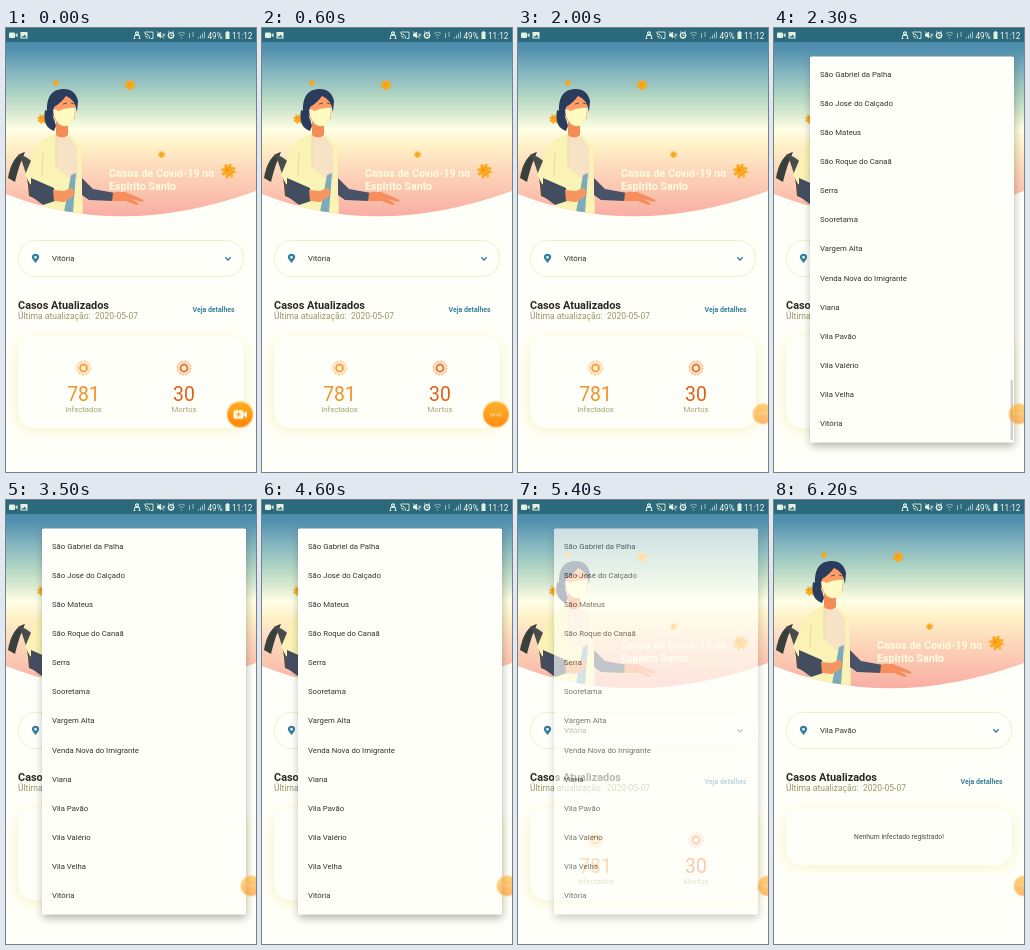
Recreate the animation shown at these times as an HTML page. Size 250x444 px, loop 8 s.

```html
<!DOCTYPE html>
<html lang="pt-BR">
<head>
<meta charset="utf-8">
<title>Casos de Covid-19</title>
<style>
html, body { margin: 0; width: 100%; height: 100%; overflow: hidden; background: #fffffa; }
svg { display: block; width: 100vw; height: 100vh; font-family: Roboto, sans-serif; }
text { white-space: pre; }
.body { font-size: 7.75px; fill: #33332b; }
.bold { font-weight: 700; }
.mid { text-anchor: middle; }

.menu, .thumb, .before, .after, .camera, .timer, .fab { animation: 8s linear infinite; }
.menu { animation-name: menu; }
.thumb { animation-name: thumb; }
.before { animation-name: before; }
.after { animation-name: after; }
.camera { animation-name: camera; }
.timer { animation-name: timer; }
.fab { animation-name: fab; }

@keyframes menu {
  0%, 28.74% { opacity: 0; }
  28.75%, 66.3% { opacity: 1; }
  70%, 100% { opacity: 0; }
}
@keyframes thumb {
  0%, 34% { opacity: .22; }
  40%, 100% { opacity: 0; }
}
@keyframes before {
  0%, 68.74% { opacity: 1; }
  68.75%, 100% { opacity: 0; }
}
@keyframes after {
  0%, 68.74% { opacity: 0; }
  68.75%, 100% { opacity: 1; }
}
@keyframes camera {
  0%, 1.2% { opacity: 1; }
  5%, 100% { opacity: 0; }
}
@keyframes timer {
  0%, 2.5% { opacity: 0; }
  6%, 10% { opacity: .85; }
  20%, 100% { opacity: .4; }
}
@keyframes fab {
  0%, 1.2% { transform: translate(234px, 386.5px); opacity: 1; }
  6%, 9.5% { transform: translate(234px, 386.3px); opacity: .94; animation-timing-function: ease-in-out; }
  20%, 62.49% { transform: translate(245px, 386px) scale(.8); opacity: .58; }
  62.5%, 100% { transform: translate(250px, 386px) scale(.8); opacity: .58; }
}
</style>
</head>
<body>
<svg viewBox="0 0 250 444" preserveAspectRatio="none">
  <defs>
    <linearGradient id="sky" x2="0" y2="188" gradientUnits="userSpaceOnUse">
      <stop offset="0" stop-color="#3b7ca2"/>
      <stop offset=".12" stop-color="#5592b0"/>
      <stop offset=".24" stop-color="#85b7c0"/>
      <stop offset=".36" stop-color="#b0d5c2"/>
      <stop offset=".46" stop-color="#dcebd2"/>
      <stop offset=".54" stop-color="#fffee6"/>
      <stop offset=".62" stop-color="#fff3c8"/>
      <stop offset=".74" stop-color="#fddabb"/>
      <stop offset="1" stop-color="#faaea4"/>
    </linearGradient>
    <linearGradient id="orange" x2="0" y2="1">
      <stop offset="0" stop-color="#ffae1c"/>
      <stop offset="1" stop-color="#ff8608"/>
    </linearGradient>
    <clipPath id="curve"><path d="M0 0H250V163Q115 212 0 166Z"/></clipPath>
    <filter id="soft" x="-20%" y="-20%" width="140%" height="140%"><feGaussianBlur stdDeviation="4"/></filter>
    <filter id="wide" x="-20%" y="-40%" width="140%" height="180%"><feGaussianBlur stdDeviation="7"/></filter>
    <g id="virus">
      <circle r="4" fill="#f9a81e"/>
      <circle r="4.6" fill="none" stroke="#f9a81e" stroke-width="1.6" stroke-dasharray="1.8 1.8"/>
      <circle cx="-1" cy="-1" r="1.1" fill="#ec9015"/>
    </g>
    <g id="case">
      <circle r="7.4" fill="currentColor" opacity=".28"/>
      <circle r="7.2" fill="none" stroke="currentColor" stroke-width="1" stroke-dasharray="1.4 2.4" opacity=".4"/>
      <circle r="3.4" fill="#fff4d6" stroke="currentColor" stroke-width="1.7"/>
    </g>
  </defs>

  <rect width="250" height="444" fill="#fffffa"/>

  <g clip-path="url(#curve)">
    <rect width="250" height="190" fill="url(#sky)"/>
    <use href="#virus" x="124" y="57"/>
    <use href="#virus" transform="translate(50 55) scale(.6)"/>
    <use href="#virus" transform="translate(36 91) scale(.9)"/>
    <use href="#virus" transform="translate(155.500 126.500) scale(.65)"/>
    <use href="#virus" transform="translate(222.500 143) scale(1.350)"/>

    <!-- Doctor at the desk -->
    <path d="M2 150Q6 127 19 124Q13 137 9 154Z" fill="#38403c"/>
    <path d="M12 126Q29 130 36 151L38 174L23 168Q22 143 12 126Z" fill="#4a4d4c"/>
    <path d="M49 106Q35 110 30 121L19 147L24 156L36 162L34 188H77L75 124Q73 112 62 107Z" fill="#faf3b5"/>
    <path d="M50 107Q56 111 62 107L71 119L72 150L67 153L50 139Z" fill="#f8e2c6"/>
    <path d="M37 125L36 148M50 107L50 139" fill="none" stroke="#dfd79c" stroke-width=".8"/>
    <path d="M50 92H62V107Q56 112 50 107Z" fill="#f48c56"/>
    <path d="M39 82Q47 84 50 98L48 103Q36 99 39 82Z" fill="#293c5c"/>
    <path d="M45 72Q57 63 69 72V90Q66 99 57 98Q48 95 45 82Z" fill="#ff9d66"/>
    <path d="M41 87Q39 62 56 61Q69 60 72 73L71 84Q69 71 60 68Q55 75 48 79L47 90Z" fill="#293c5c"/>
    <path d="M47 81L53 83Q61 79 69 80L68 93Q65 99 57 98Q49 96 47 81Z" fill="#fffac2"/>
    <path d="M57 76L61 75M65 75L68 76" stroke="#493744" stroke-width=".8"/>
    <path d="M65 147L70 145L67 184H58Z" fill="#7eabb8"/>
    <path d="M25 150L48 160L49 173L37 177L25 168Z" fill="#434d60"/>
    <path d="M47 162L58 163L65 160L69 164L66 169L58 174L48 173Z" fill="#f79561"/>
    <path d="M76 150L87 161L109 165L107 173L83 172L76 167Z" fill="#4a5267"/>
    <path d="M107 165Q117 162 124 166L138 172L136 174L126 171L133 176L130 177L120 173L106 173Z" fill="#f58d5c"/>
  </g>
  <g class="bold" font-size="10.7" fill="#fffde0">
    <text x="103" y="149">Casos de Covid-19 no</text>
    <text x="103" y="162">Espírito Santo</text>
  </g>

  <rect x="12.500" y="212.500" width="225" height="36" rx="17" fill="#fffffa" stroke="#ebeabd" stroke-width=".8"/>
  <path d="M29.500 235Q25.900 231 25.900 229.300A3.600 3.600 0 0 1 33.100 229.300Q33.100 231 29.500 235Z" fill="#337da0"/>
  <circle cx="29.500" cy="229.300" r="1.300" fill="#fffff4"/>
  <path d="M219.200 229.300L222 232L224.800 229.300" fill="none" stroke="#337da0" stroke-width="1.300"/>
  <text class="body before" x="46" y="233">Vitória</text>
  <text class="body after" x="46" y="233">Vila Pavão</text>

  <text class="bold" x="12" y="281" font-size="10.9" fill="#292922">Casos Atualizados</text>
  <text x="12" y="291" font-size="8.55" fill="#96966a">Última atualização:  2020-05-07</text>
  <text class="bold" x="186.500" y="284" font-size="6.95" fill="#397f9d">Veja detalhes</text>

  <g class="before">
    <rect x="10" y="311" width="230" height="92" rx="16" fill="#f1efb4" opacity=".65" filter="url(#wide)"/>
    <rect x="12" y="308" width="226" height="92" rx="16" fill="#fffff9"/>
    <use href="#case" x="77.500" y="340" color="#f79b2c"/>
    <use href="#case" x="178" y="340" color="#e87030"/>
    <g class="mid" font-size="19.4">
      <text x="77.500" y="373" fill="#f4922b">781</text>
      <text x="178" y="373" fill="#e2601a">30</text>
    </g>
    <g class="mid" font-size="7.75" fill="#a3a274">
      <text x="77.500" y="384">Infectados</text>
      <text x="178" y="384">Mortos</text>
    </g>
  </g>
  <g class="after">
    <rect x="10" y="311" width="230" height="56" rx="16" fill="#f1efb4" opacity=".65" filter="url(#wide)"/>
    <rect x="12" y="308" width="226" height="57" rx="16" fill="#fffff9"/>
    <text class="mid" x="125" y="339" font-size="6.8" fill="#4c4c42">Nenhum infectado registrado!</text>
  </g>

  <g class="menu">
    <rect x="37" y="32" width="203" height="386" rx="2" fill="#45453c" opacity=".42" filter="url(#soft)"/>
    <rect x="36" y="28.500" width="204" height="386" rx="1.500" fill="#fffffa"/>
    <g id="cities" class="body"></g>
    <rect class="thumb" x="236.500" y="352" width="2.500" height="60" fill="#333"/>
  </g>

  <!-- Status bar -->
  <rect width="250" height="14" fill="#2b6a7d"/>
  <g fill="#e6f0e0">
    <rect x="3" y="4.500" width="6" height="5.500" rx="1"/>
    <path d="M9 7L11.500 5V9.500Z"/>
    <path d="M14.500 4H21.500V10.500H14.500ZM15.500 9.500H20.500L18.700 6.500L17.300 8.400L16.500 7.500Z" fill-rule="evenodd"/>
    <path d="M151 5.500H152.500L155 3.500V10.500L152.500 8.500H151Z"/>
    <path d="M219.500 4H220.700V3H222.300V4H223.500V11H219.500Z"/>
    <path d="M192 10.500H193V9H192ZM194 10.500H195V7H194ZM196 10.500H197V5H196ZM198 10.500H199V3.500H198Z" opacity=".65"/>
  </g>
  <g fill="none" stroke="#e6f0e0" stroke-width=".9">
    <path d="M131 3.500V6.500M128.500 10V7.500H133.500V10M127.500 10.500H129.500M132.500 10.500H134.500M129.500 4H132.500V6.500H129.500Z"/>
    <path d="M139 6V4H147V10.500H144.500M139 8Q141.500 8 141.500 10.500M139 6Q143.500 6 143.500 10.500"/>
    <path d="M156.500 5.500L159 8.500M159 5.500L156.500 8.500M151 3.500L158 10.500"/>
    <circle cx="165" cy="7.300" r="2.700" stroke-width="1.3"/>
    <path d="M165 5.500V7.500H166.500M162 4.500L163.500 3.200M168 4.500L166.500 3.200"/>
    <path d="M172 5.500Q175.500 2.500 179 5.500M173.500 7.500Q175.500 6 177.500 7.500M175.500 9V10.500M183.500 5V10M187 4V9" opacity=".65"/>
  </g>
  <g font-size="8.2" fill="#f5f8ec">
    <text x="201.500" y="10.500">49%</text>
    <text x="226" y="10.500">11:12</text>
  </g>

  <g class="fab">
    <circle r="13.800" fill="#ffc470" opacity=".45"/>
    <circle r="12.600" fill="url(#orange)"/>
    <g class="camera">
      <rect x="-6.500" y="-4.300" width="10" height="8.600" rx="1.500" fill="#fffbe0"/>
      <path d="M3.500 -.8L7 -3.500V3.500L3.500 .8Z" fill="#fffbe0"/>
      <path d="M-1.500 -2.200V2.200M-3.700 0H.7" stroke="#ff9618" stroke-width="1.200"/>
    </g>
    <text class="timer mid bold" y="1.600" font-size="4.4" fill="#fff3c4">00:02</text>
  </g>
</svg>
<script>
const cities = ['São Gabriel da Palha', 'São José do Calçado', 'São Mateus',
  'São Roque do Canaã', 'Serra', 'Sooretama', 'Vargem Alta', 'Venda Nova do Imigrante',
  'Viana', 'Vila Pavão', 'Vila Valério', 'Vila Velha', 'Vitória'];
document.getElementById('cities').innerHTML = cities
  .map((city, i) => `<text x="46" y="${48.5 + i * 29.15}">${city}</text>`).join('');
</script>
</body>
</html>
```
